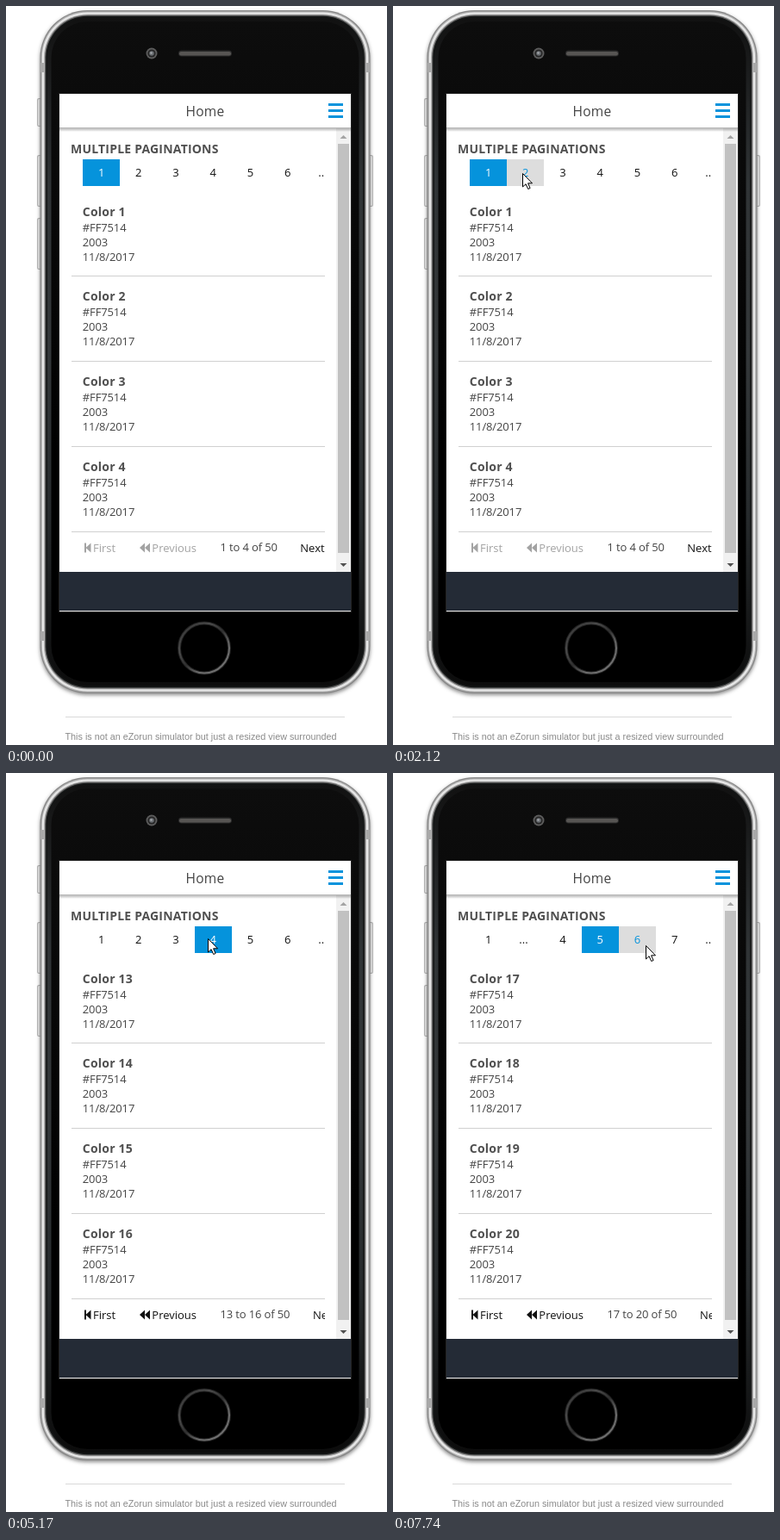
An HTML page with a canvas that plays this animation: 442 by 858 pixels, repeating every 8 s.

```html
<!DOCTYPE html>
<html lang="en">
<head>
<meta charset="utf-8">
<title>Multiple paginations</title>
<style>
  html, body { margin: 0; width: 442px; height: 858px; overflow: hidden; background: #fff; }
  canvas { display: block; }
</style>
</head>
<body>
<canvas id="stage" width="442" height="858"></canvas>
<script>
const ctx = document.getElementById('stage').getContext('2d');
const LOOP = 8000;
const BLUE = '#0593dc';
const SANS = '"Open Sans", sans-serif';
const HEADING = { font: 'bold 14px ' + SANS, color: '#505050', spacing: 0.2 };
const DETAIL = { spacing: -0.13 };
const CELL_TOP = 178, CELL_HEIGHT = 31;

// Page shown from each time on; the list stays empty for `blank` ms.
const pages = [
  { at: 0, page: 1, blank: 0 },
  { at: 2520, page: 2, blank: 80 },
  { at: 3830, page: 3, blank: 0 },
  { at: 4850, page: 4, blank: 0 },
  { at: 6020, page: 5, blank: 80 },
];

// Pointer moves: first step, last step, number of steps, destination.
const moves = [
  [130, 130, 1, 328, 806],
  [205, 280, 2, 286, 662],
  [510, 670, 3, 146, 393],
  [910, 1130, 4, 103, 260],
  [1280, 1510, 4, 107, 193],
  [1588, 2050, 7, 147, 194],
  [2120, 2120, 1, 150, 194],
  [3130, 3130, 1, 154, 194],
  [3206, 3510, 5, 192, 192],
  [4150, 4230, 2, 221, 189],
  [4306, 4530, 4, 231, 192],
  [5170, 5550, 6, 272, 193],
  [6420, 6970, 8, 325, 199],
  [7580, 7740, 3, 293, 200],
];

const smooth = u => u * u * (3 - 2 * u);

function pointerAt(t) {
  let pos = null;
  for (const [from, to, steps, x, y] of moves) {
    if (t < from) break;
    const gap = (to - from) / Math.max(1, steps - 1);
    const done = gap ? Math.min(steps, Math.floor((t - from) / gap + 0.02) + 1) : 1;
    const u = smooth(done / steps);
    pos = pos
      ? { x: Math.round(pos.x + (x - pos.x) * u), y: Math.round(pos.y + (y - pos.y) * u) }
      : { x, y };
  }
  return pos;
}

function rect(x, y, w, h, color) {
  ctx.fillStyle = color;
  ctx.fillRect(x, y, w, h);
}

function pill(x, y, w, h, r, color) {
  ctx.beginPath();
  ctx.roundRect(x, y, w, h, r);
  ctx.fillStyle = color;
  ctx.fill();
}

function disc(x, y, r, color) {
  ctx.beginPath();
  ctx.arc(x, y, r, 0, Math.PI * 2);
  ctx.fillStyle = color;
  ctx.fill();
}

function ring(x, y, r, width, color) {
  ctx.beginPath();
  ctx.arc(x, y, r, 0, Math.PI * 2);
  ctx.lineWidth = width;
  ctx.strokeStyle = color;
  ctx.stroke();
}

function polygon(points, color) {
  ctx.beginPath();
  points.forEach(([x, y]) => ctx.lineTo(x, y));
  ctx.closePath();
  ctx.fillStyle = color;
  ctx.fill();
}

function text(str, x, y, { color = '#444', font = '13px ' + SANS, align = 'left', spacing = 0 } = {}) {
  ctx.font = font;
  ctx.textAlign = align;
  ctx.letterSpacing = spacing + 'px';
  ctx.fillStyle = color;
  ctx.fillText(str, x, y);
}

function gradient(x0, y0, x1, y1, ...colors) {
  const g = ctx.createLinearGradient(x0, y0, x1, y1);
  colors.forEach((c, i) => g.addColorStop(i / (colors.length - 1), c));
  return g;
}

function sideButton(x, y, h) {
  pill(x, y, 7, h, 2, '#b8b8b8');
  pill(x + 1, y + 1, 5, h - 2, 1.5, '#ececec');
}

function drawPhone() {
  sideButton(36, 107, 33);
  sideButton(36, 173, 60);
  sideButton(36, 246, 60);
  sideButton(419, 173, 60);

  const layer = (inset, color) =>
    pill(39.5 + inset, 5 + inset, 383 - 2 * inset, 793 - 2 * inset, 55 - inset, color);
  ctx.save();
  ctx.shadowColor = 'rgba(0,0,0,.45)';
  ctx.shadowBlur = 4;
  ctx.shadowOffsetY = 2;
  layer(0, '#858585');
  ctx.restore();
  layer(1.2, '#b4b4b4');
  layer(2.4, '#e9e9e9');
  for (const y of [66, 726]) {
    rect(40, y, 6, 11, '#a8a8a8');
    rect(416, y, 6, 11, '#a8a8a8');
  }
  layer(4.4, '#b4b4b4');
  layer(5.6, '#5a5a5a');
  layer(6.8, '#121414');
  layer(8.5, gradient(0, 13, 0, 789, '#111', '#303436', '#34383a', '#262a2c', '#0c0c0c'));
  layer(13, gradient(0, 18, 0, 784, '#0d0d0d', '#070707', '#000', '#000'));

  disc(169, 55, 6.5, '#5c5c5c');
  disc(169, 55, 4.6, '#262626');
  disc(169, 55, 2.8, '#6a6e72');
  disc(168.5, 54.5, 1.2, '#a4a8ac');
  pill(200, 51.5, 62, 7, 3.5, '#2a2a2a');
  pill(201, 53, 60, 4.5, 2.2, '#575553');

  ring(230, 745.5, 29, 4, '#222');
  ring(230, 745.5, 29, 2, gradient(208, 722, 252, 769, '#3a3a3a', '#4c4c4c', '#303030', '#6c6c6c', '#707070'));
}

function drawScreen() {
  rect(61, 101, 340, 603, '#242424');
  rect(62, 102, 338, 601, '#fff');
  text('Home', 231, 128, { font: '15.5px ' + SANS, align: 'center', spacing: 0.25 });
  for (const y of [113, 120, 127]) rect(374, y, 17, 3, BLUE);

  rect(383, 142, 17, 515, '#f1f1f1');
  rect(385, 160, 13, 475, '#c1c1c1');
  polygon([[387.5, 154], [391.5, 150], [395.5, 154]], '#a3a3a3');
  polygon([[387.5, 647], [395.5, 647], [391.5, 651]], '#505050');
  rect(62, 141, 338, 5, gradient(0, 141, 0, 146, 'rgba(0,0,0,.3)', 'rgba(0,0,0,.18)', 'rgba(0,0,0,0)'));

  rect(62, 657, 338, 45, '#242b36');
  rect(62, 702, 338, 1, '#e8e8e8');
  text('MULTIPLE PAGINATIONS', 75, 171, HEADING);
}

function drawPager(page, pointer) {
  const labels = page <= 4
    ? [1, 2, 3, 4, 5, 6, '...']
    : [1, '...', page - 1, page, page + 1, page + 2, '...'];
  const edge = i => Math.round(89 + 43.2 * i);
  labels.forEach((label, i) => {
    const left = edge(i), width = edge(i + 1) - left;
    const active = label === page;
    const hover = !active && pointer
      && pointer.x >= left && pointer.x < left + width
      && pointer.y >= CELL_TOP && pointer.y < CELL_TOP + CELL_HEIGHT;
    if (active || hover) rect(left, CELL_TOP, width, CELL_HEIGHT, active ? BLUE : '#ddd');
    const middle = 89 + 43.2 * i + (label === '...' ? 19.3 : 21.6);
    const color = active ? '#fff' : hover ? BLUE : '#111';
    text(String(label), middle, 198, { color, align: 'center' });
  });
}

function drawList(page) {
  for (let i = 0; i < 4; i++) {
    const y = 244 + Math.floor(98.7 * i);
    text('Color ' + (page * 4 - 3 + i), 88.8, y, HEADING);
    ['#FF7514', '2003', '11/8/2017'].forEach((line, k) => text(line, 88.8, y + 18 + 17 * k, DETAIL));
    rect(76, 313 + 99 * i, 294, 1, '#d0d0d0');
  }
}

function drawFooter(page) {
  const color = page === 1 ? '#a3a3a3' : '#111';
  const arrow = (x, w) => polygon([[x, 629], [x + w, 623.5], [x + w, 634.5]], color);
  rect(91, 623.5, 2, 11, color);
  arrow(92.5, 6);
  arrow(155, 6);
  arrow(161, 6);
  text('First', 101, 634, { color });
  text('Previous', 169.3, 634, { color });
  const range = `${page * 4 - 3} to ${page * 4} of 50`;
  text(range, 248.4, 633, DETAIL);
  text('Next', 341.3 + 7.3 * (range.length - 12), 634, { color: '#111' });
}

function drawPointer({ x, y }) {
  ctx.save();
  ctx.translate(x + 0.5, y + 0.5);
  polygon([[0, 0], [0, 15.5], [3.6, 12.2], [6.2, 18], [8.6, 17], [6.1, 11.3], [11, 11.3]], '#fff');
  ctx.lineWidth = 1;
  ctx.strokeStyle = '#000';
  ctx.stroke();
  ctx.restore();
}

function draw(t) {
  const pointer = pointerAt(t);
  const { at, page, blank } = pages.findLast(p => t >= p.at);

  rect(0, 0, 442, 858, '#fff');
  drawPhone();
  drawScreen();

  ctx.save();
  ctx.beginPath();
  ctx.rect(76, 146, 294, 511);
  ctx.clip();
  drawPager(page, pointer);
  if (t >= at + blank) drawList(page);
  drawFooter(page);
  ctx.restore();

  rect(69, 825, 324, 1, '#d9d9d9');
  text('This is not an eZorun simulator but just a resized view surrounded', 68.5, 852,
    { font: '10.8px "Liberation Sans", Arial, sans-serif', color: '#8a8a8a' });
  if (pointer) drawPointer(pointer);
}

const start = performance.now();
function tick() {
  draw((performance.now() - start) % LOOP);
  requestAnimationFrame(tick);
}
tick();
</script>
</body>
</html>
```
